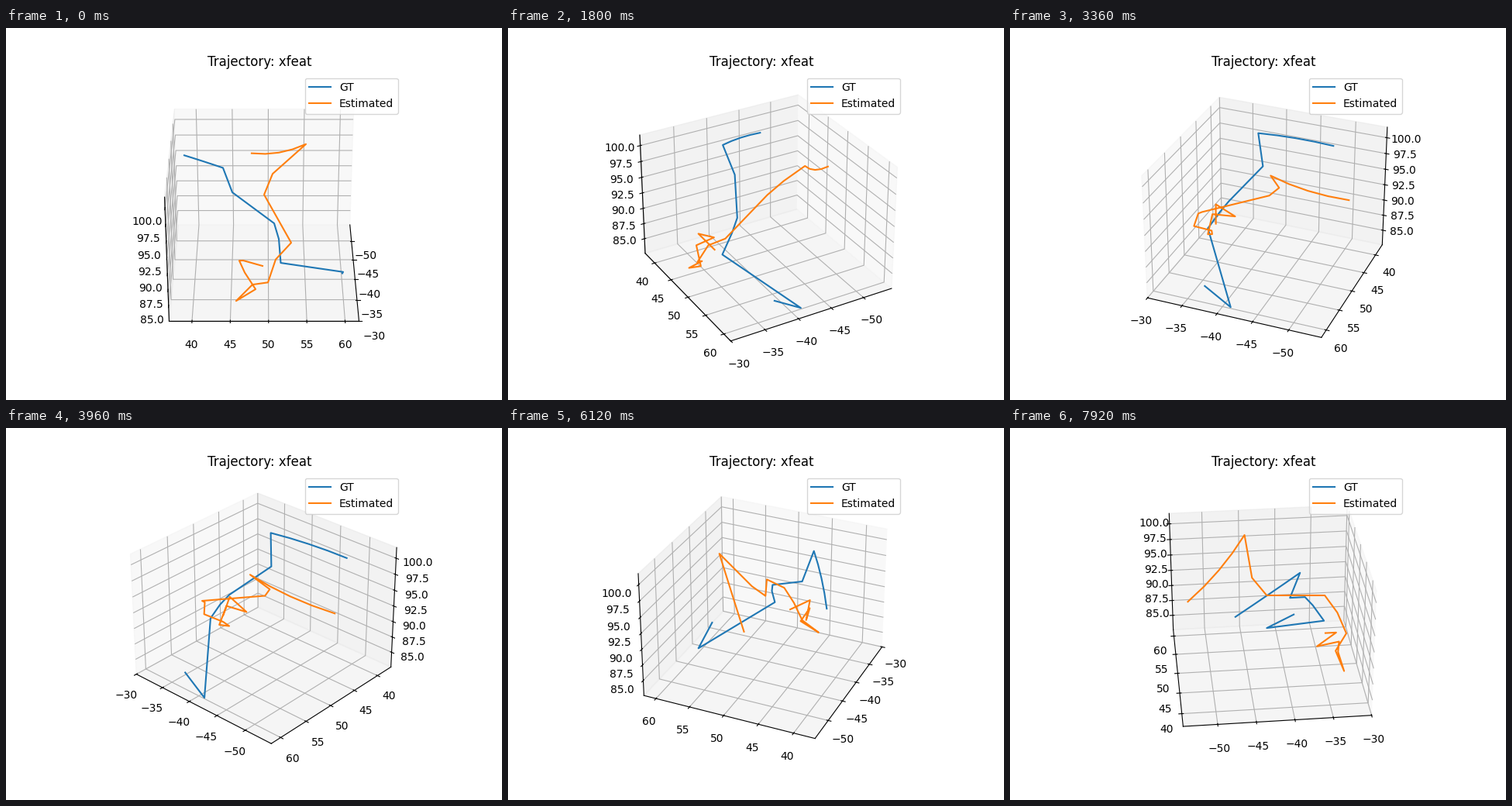
These frames come from a looping animation (640 px wide and 480 px high, 8000 ms). A matplotlib script:

```python
import matplotlib.pyplot as plt
import numpy as np
from matplotlib.animation import FuncAnimation

TICK = 40         # ms per animation frame
LOOP = 8000       # ms per loop
HOLD = 3          # frames each view stays on screen
TURN = 4          # degrees of azimuth per view


def arc(a, m, b, n=5):
    """Parabola from a through m (halfway) to b."""
    a, m, b = np.array([a, m, b])
    t = np.linspace(0, 1, n)[:, None]
    return a + (b - a) * t + (4 * m - 2 * (a + b)) * t * (1 - t)


# Each track opens with an arc, then runs straight between its corners
gt = np.vstack([
    arc((-47.43, 38.59, 98.07), (-42.98, 41.18, 99.66), (-38.67, 44.08, 101.01)),
    (-39.80, 45.23, 96.61), (-37.12, 50.74, 93.39), (-35.97, 51.35, 91.65),
    (-34.37, 51.60, 88.90), (-41.27, 60.24, 82.94), (-37.48, 59.91, 85.20),
])
estimated = np.vstack([
    arc((-52.89, 47.68, 95.40), (-48.52, 51.43, 97.90), (-44.78, 54.99, 101.26)),
    (-44.22, 50.56, 96.96), (-42.39, 49.42, 94.74), (-34.14, 52.94, 92.21),
    (-32.68, 50.92, 90.53), (-31.53, 49.92, 87.67), (-33.25, 47.89, 86.18),
    (-32.36, 45.74, 84.16), (-32.85, 48.30, 85.71), (-32.97, 46.89, 88.28),
    (-36.04, 46.13, 88.18), (-33.42, 46.69, 89.89), (-34.49, 49.21, 88.34),
])

fig = plt.figure(figsize=(6.4, 4.8), dpi=100)
ax = fig.add_subplot(projection="3d")
ax.plot(*gt.T, label="GT")
ax.plot(*estimated.T, label="Estimated")

# Fit the box to the data: 5% margin in x and y, plus 1/48 on every side
points = np.vstack([gt, estimated])
low, high = points.min(axis=0), points.max(axis=0)
half = (high - low) * (0.5 + np.array([0.05, 0.05, 0])) * 25 / 24
middle = (low + high) / 2
xlim, ylim, zlim = zip(middle - half, middle + half)
ax.set(xlim=xlim, ylim=ylim, zlim=zlim)

ax.set_title("Trajectory: xfeat", x=0.4985)
ax.legend(loc="upper right")


def update(n):
    ax.view_init(elev=30, azim=TURN * (n // HOLD))
    return ax.lines


ani = FuncAnimation(fig, update, frames=LOOP // TICK, interval=TICK,
                    repeat=True, repeat_delay=0, blit=False)
plt.show()
```
